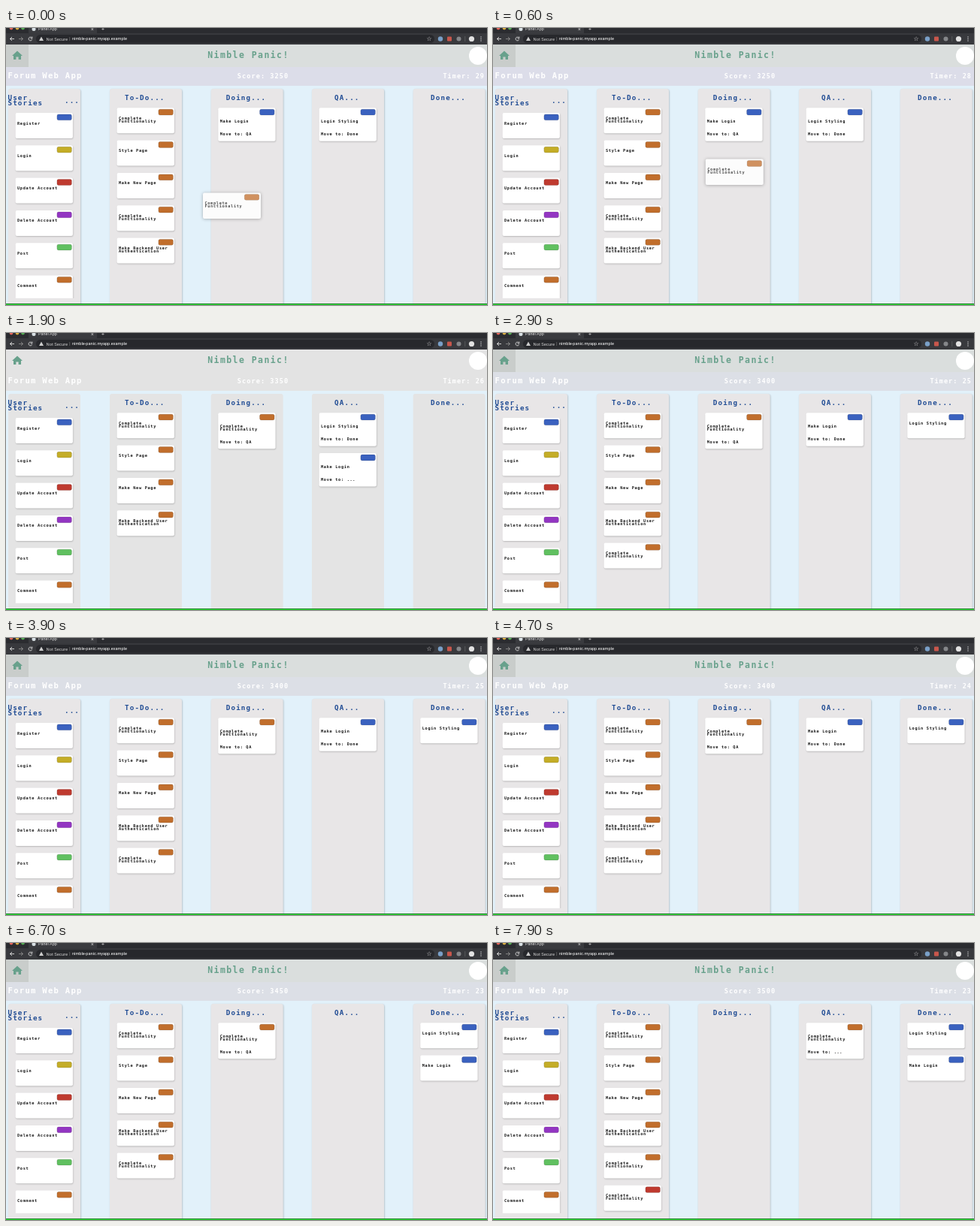
Write an HTML page with a canvas that moves like this. It is 640 px wide and 369 px high and loops after 8 s.

```html
<!DOCTYPE html>
<html lang="en">
<head>
<meta charset="utf-8">
<title>Task board</title>
<style>
  html, body { margin: 0; width: 640px; height: 369px; overflow: hidden; }
  canvas { display: block; }
</style>
</head>
<body>
<canvas id="stage" width="640" height="369"></canvas>
<script>
const ctx = document.getElementById('stage').getContext('2d');
const LOOP = 8000;
const MONO = '"DejaVu Sans Mono", monospace';
const SANS = 'Roboto, sans-serif';
const BLUE = '#3a61bf', ORANGE = '#c16e2c', RED = '#bf3a2f';
const YELLOW = '#c4ad27', PURPLE = '#9336c2', GREEN = '#60c060';
const NAVY = '#204c94', TEAL = '#68a18c', INK = '#161616';
const COLUMNS = [3, 138, 272.7, 407, 541.7];
const COMPLETE = 'Complete|Functionality';
const BACKEND = 'Make Backend User|Authentication';

// Moments at which a card lands in its next column
const DROP = [700, 1700, 2600, 6200, 7600];

// Drags: start, end, start point, end point, title, colour
const DRAGS = [
  [0, DROP[0], 262, 219.5, 284, 172, COMPLETE, ORANGE],
  [1500, DROP[1], 286, 108, 418, 158, 'Make Login', BLUE],
  [2250, DROP[2], 421, 109, 550, 118, 'Login Styling', BLUE],
  [5600, DROP[3], 421, 109, 549, 158, 'Make Login', BLUE],
  [7000, DROP[4], 286, 108, 417, 114, COMPLETE, ORANGE]
];

function rect(x, y, w, h, color) {
  ctx.fillStyle = color;
  ctx.fillRect(x, y, w, h);
}

function round(x, y, w, h, r, color) {
  ctx.fillStyle = color;
  ctx.beginPath();
  ctx.roundRect(x, y, w, h, r);
  ctx.fill();
}

function circle(x, y, r, color) {
  ctx.fillStyle = color;
  ctx.beginPath();
  ctx.arc(x, y, r, 0, 7);
  ctx.fill();
}

function line(points, color, width = 1) {
  ctx.strokeStyle = color;
  ctx.lineWidth = width;
  ctx.beginPath();
  points.forEach(p => ctx.lineTo(...p));
  ctx.stroke();
}

function write(s, x, y, size, color, align, font, weight, gap) {
  ctx.font = `${weight} ${size}px ${font}`;
  ctx.letterSpacing = gap + 'px';
  ctx.textAlign = align;
  ctx.textBaseline = 'middle';
  ctx.fillStyle = color;
  ctx.fillText(s, x, y);
}

// Game text is low and widely spaced; browser labels are plain
const text = (s, x, y, size, color, align = 'left') =>
  write(s, x, y, size, color, align, MONO, 'bold', size * .125);
const label = (s, x, y, size, color) =>
  write(s, x, y, size, color, 'left', SANS, 'normal', 0);

function shadow(color, blur, dx, dy) {
  ctx.shadowColor = color;
  ctx.shadowBlur = blur;
  ctx.shadowOffsetX = dx;
  ctx.shadowOffsetY = dy;
}

const noShadow = () => shadow('transparent', 0, 0, 0);

function cardFace(x, y, [title, color, next]) {
  const lines = title.split('|');
  const top = y + (next ? 18.3 : 14.2);
  round(x + 55.3, y + 2, 19.5, 7.8, 2, color);
  ctx.strokeStyle = 'rgba(0,0,0,.2)';
  ctx.lineWidth = .7;
  ctx.stroke();
  lines.forEach((s, i) => text(s, x + 2.4, top + i * 4, 5.3, INK));
  if (next) text('Move to: ' + next, x + 2.4, y + 32.3 + lines.length * 3.5, 5.3, INK);
}

// Draws a card and returns its height
function card(x, y, data) {
  const [title, , next] = data;
  const h = next ? 41 + title.split('|').length * 3.5 : 34;
  shadow('rgba(0,0,0,.2)', 2, .5, 1);
  round(x, y, 76.3, h, 2, '#fff');
  noShadow();
  cardFace(x, y, data);
  return h;
}

function board(t) {
  const past = i => t >= DROP[i];
  const todo = [[COMPLETE, ORANGE], ['Style Page', ORANGE], ['Make New Page', ORANGE]];
  if (!past(0)) todo.push([COMPLETE, ORANGE]);
  todo.push([BACKEND, ORANGE]);
  if (t >= 2700) todo.push([COMPLETE, ORANGE]);
  if (past(4)) todo.push([COMPLETE, RED]);

  const doing = [], qa = [], done = [];
  if (!past(1)) doing.push(['Make Login', BLUE, 'QA']);
  if (past(0) && !past(4)) doing.push([COMPLETE, ORANGE, t < 1800 ? '...' : 'QA']);
  if (!past(2)) qa.push(['Login Styling', BLUE, 'Done']);
  if (past(1) && !past(3)) qa.push(['Make Login', BLUE, t < 2700 ? '...' : 'Done']);
  if (past(4)) qa.push([COMPLETE, ORANGE, '...']);
  if (past(2)) done.push(['Login Styling', BLUE]);
  if (past(3)) done.push(['Make Login', BLUE]);

  const stories = [['Register', BLUE], ['Login', YELLOW], ['Update Account', RED],
    ['Delete Account', PURPLE], ['Post', GREEN], ['Comment', ORANGE]];
  return [stories, todo, doing, qa, done];
}

function browser() {
  rect(0, 0, 640, 8, '#2b2c30');
  round(30, -4, 91, 13, 3, '#3a3b3f');
  rect(0, 7, 640, 15, '#38393d');
  circle(7, 0, 2.4, '#e4655b');
  circle(15, 0, 2.4, '#d6ac42');
  circle(22.5, 0, 2.4, '#55ad55');
  circle(37, 1.5, 2.5, '#d8e0e4');
  label('Panel App', 43, 1.5, 5.5, '#d8d8d8');
  label('×', 113, 1.5, 7, '#ccc');
  label('+', 127, 1.5, 7, '#ccc');
  round(40, 9, 530, 11, 5.5, '#27282c');

  line([[11, 14.5], [5.5, 14.5], [8, 12], [5.5, 14.5], [8, 17]], '#ddd', .9);
  line([[17, 14.5], [22.5, 14.5], [20, 12], [22.5, 14.5], [20, 17]], '#888', .9);
  ctx.strokeStyle = '#ddd';
  ctx.beginPath();
  ctx.arc(32.5, 14.5, 2.4, .4, 5.5);
  ctx.stroke();
  line([[34.8, 11.5], [34.8, 14], [32.5, 14]], '#ddd', .9);

  ctx.fillStyle = '#ccc';
  ctx.beginPath();
  ctx.moveTo(47, 11.5);
  ctx.lineTo(50, 17);
  ctx.lineTo(44, 17);
  ctx.fill();
  label('Not Secure', 53.5, 14.8, 5.8, '#ccc');
  rect(84.5, 12, .6, 5, '#777');
  label('nimble-panic.myapp.example', 88, 14.8, 5.6, '#fff');

  write('☆', 563, 14.5, 8, '#eee', 'center', '"DejaVu Sans", sans-serif', 'normal', 0);
  circle(578, 14.5, 3.2, '#7aa0c8');
  round(587, 11.5, 6, 6, 1, '#c8574c');
  circle(602.5, 14.5, 3, '#85878a');
  rect(610.5, 11, .7, 7, '#66686b');
  circle(619.5, 14.5, 3.6, '#e2e2e2');
  [12, 14.5, 17].forEach(y => circle(632, y, .7, '#ddd'));
}

function home() {
  ctx.fillStyle = TEAL;
  ctx.beginPath();
  [[15, 30.5], [22, 37], [20, 37], [20, 42], [16.6, 42], [16.6, 38.5], [13.4, 38.5],
    [13.4, 42], [10, 42], [10, 37], [8, 37]].forEach(p => ctx.lineTo(...p));
  ctx.fill();
}

function header(t, plain) {
  rect(0, 22, 640, 30, plain ? '#e3e3e3' : '#dadedd');
  rect(0, 52, 640, 25, plain ? '#e3e3e3' : t < 1000 ? '#dcdde9' : '#dcdfe6');
  if (!plain) rect(0, 22, 30, 30, '#c9cdcb');
  home();
  text('Nimble Panic!', 322.5, 36.7, 11.5, TEAL, 'center');
  circle(628, 37, 12, '#fff');

  const score = 3250 + 50 * DROP.filter(d => t >= d).length;
  const timer = 29 - [600, 1200, 1800, 2800, 4500, 6400].filter(s => t >= s).length;
  text('Forum Web App', 2.5, 64.7, 10.5, '#fff');
  text('Score: ' + score, 342, 64.7, 8.6, '#fff', 'center');
  text('Timer: ' + timer, 637, 64.7, 8.5, '#fff', 'right');
}

function columns(t, plain) {
  rect(0, 77, 640, 290, '#e2f1fa');
  board(t).forEach((cards, i) => {
    const x = COLUMNS[i];
    if (!plain) shadow('rgba(0,0,0,.22)', 2, .7, .7);
    round(x, 81, 96, 290, 3, plain ? '#e4e4e4' : '#e8e6e7');
    noShadow();
    if (i === 0) {
      text('User', 2.5, 93.8, 9.2, NAVY);
      text('Stories', 2.5, 100.6, 9.2, NAVY);
      text('...', 78, 97.5, 9.2, NAVY);
    } else {
      const title = ['To-Do...', 'Doing...', 'QA...', 'Done...'][i - 1];
      text(title, x + 46.8, 94, 9.2, NAVY, 'center');
    }
    // The card list scrolls inside the column
    ctx.save();
    ctx.beginPath();
    ctx.rect(x, 81, 96, 279);
    ctx.clip();
    let y = i ? 106.3 : 113;
    cards.forEach(c => y += card(x + 9.6, y, c) + 9.3);
    ctx.restore();
  });
}

function ghosts(t) {
  for (const [start, end, x0, y0, x1, y1, title, color] of DRAGS) {
    if (t < start || t >= end) continue;
    const p = (t - start) / (end - start);
    const k = p * p * (3 - 2 * p);
    const x = x0 + (x1 - x0) * k, y = y0 + (y1 - y0) * k;
    shadow('rgba(0,0,0,.3)', 4, 0, .5);
    round(x, y, 77, 34.5, 2, '#fcfcfc');
    noShadow();
    ctx.globalAlpha = .75;
    cardFace(x, y, [title, color]);
    ctx.globalAlpha = 1;
  }
}

function draw(now) {
  const t = now % LOOP;
  const plain = t >= 1000 && t < 2800;
  columns(t, plain);
  header(t, plain);
  browser();
  ghosts(t);
  rect(0, 367, 640, 1, '#1c7a26');
  rect(0, 368, 640, 1, '#35e03c');
  requestAnimationFrame(draw);
}

requestAnimationFrame(draw);
</script>
</body>
</html>
```
